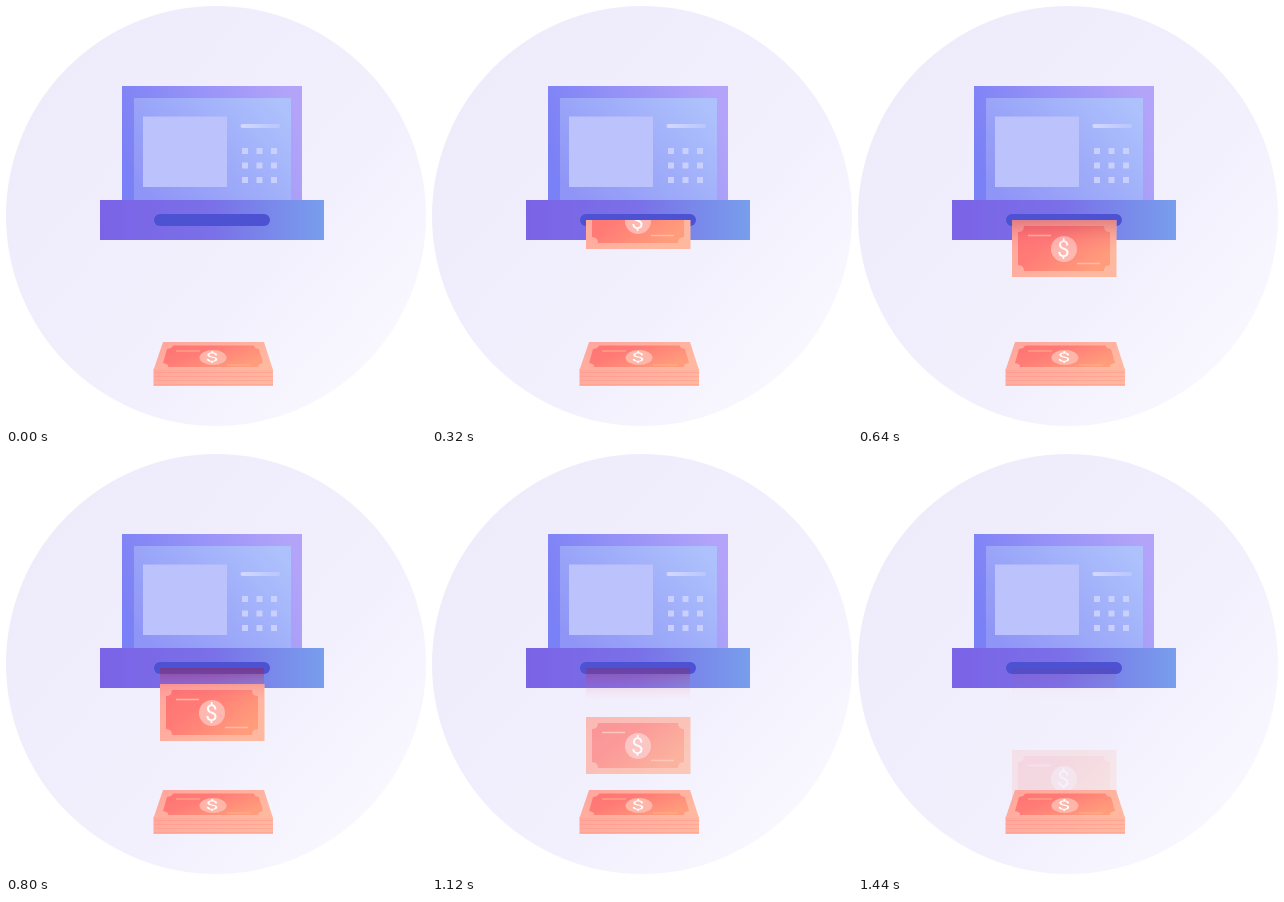
Write an HTML page that moves like this. It is 420 px wide and 420 px high and loops after 1.6 s.

```html
<!DOCTYPE html>
<html lang="en">
<head>
<meta charset="utf-8">
<title>Cash machine</title>
<style>
  html, body { margin: 0; width: 100%; height: 100%; overflow: hidden; background: #fff; }
  svg { display: block; width: 100vw; height: 100vh; }
  text { font: 22px Roboto, Arial, sans-serif; fill: #fff; text-anchor: middle; }
</style>
</head>
<body>
<svg viewBox="0 0 420 420">
  <defs>
    <linearGradient id="back" x1=".1" y1=".15" x2=".9" y2=".85">
      <stop stop-color="#eeecfb"/><stop offset=".65" stop-color="#f2f0fd"/><stop offset="1" stop-color="#f9f8ff"/>
    </linearGradient>
    <linearGradient id="case" x1="0" y1=".6" x2="1" y2=".4">
      <stop stop-color="#7a80f5"/><stop offset="1" stop-color="#b3a4f9"/>
    </linearGradient>
    <linearGradient id="panel" x1="0" y1=".8" x2="1" y2=".2">
      <stop stop-color="#8f95f6"/><stop offset="1" stop-color="#adc1fc"/>
    </linearGradient>
    <linearGradient id="base">
      <stop stop-color="#7b63e6"/><stop offset=".5" stop-color="#7a70e8"/><stop offset="1" stop-color="#789eec"/>
    </linearGradient>
    <linearGradient id="shine">
      <stop stop-color="#d4d9ff"/><stop offset="1" stop-color="#d4d9ff" stop-opacity=".35"/>
    </linearGradient>
    <linearGradient id="paper" x2="1" y2=".6">
      <stop stop-color="#ffa59d"/><stop offset="1" stop-color="#ffb8a0"/>
    </linearGradient>
    <linearGradient id="ink" x2="1" y2=".6">
      <stop stop-color="#ff7474"/><stop offset=".4" stop-color="#ff7b76"/><stop offset="1" stop-color="#ff9c7c"/>
    </linearGradient>
    <linearGradient id="shade" x2="0" y2="1">
      <stop stop-color="#a01e46" stop-opacity=".45"/><stop offset=".2" stop-color="#b4284b" stop-opacity=".36"/>
      <stop offset=".6" stop-color="#e65078" stop-opacity=".15"/><stop offset="1" stop-color="#ff6e8c" stop-opacity="0"/>
    </linearGradient>
    <clipPath id="below"><path d="M0 214H420V420H0z"/></clipPath>
  </defs>

  <circle cx="210" cy="210" r="210" fill="url(#back)"/>
  <path d="M116 80H296V194H116z" fill="url(#case)"/>
  <path d="M128 92H285V194H128z" fill="url(#panel)"/>
  <path d="M137 110.500H221V181H137z" fill="#bcc2fb"/>
  <rect x="234.500" y="118" width="39.500" height="4" rx="2" fill="url(#shine)"/>
  <g id="keys" fill="#c9d0fd"></g>
  <path d="M94 194H318V234H94z" fill="url(#base)"/>
  <rect x="148" y="208" width="116" height="12" rx="6" fill="#4c52d2"/>

  <g clip-path="url(#below)">
    <g id="bill">
      <path d="M0 0H104.500V57H0z" fill="url(#paper)"/>
      <path d="M12 6H92Q92 12 98 12V45Q92 45 92 51H12Q12 45 6 45V12Q12 12 12 6z" fill="url(#ink)"/>
      <path d="M16 15.500H39M65 43.500H88" stroke="#ffb9a4" stroke-width="1.500"/>
      <circle cx="52" cy="29" r="13" fill="#ffb8b0"/>
      <text x="51.500" y="37">$</text>
    </g>
  </g>
  <path id="shadow" d="M154 214H258V246H154z" fill="url(#shade)"/>

  <path d="M147.500 363H267V380H147.500z" fill="url(#paper)"/>
  <path d="M148 366.500H267M148 370.500H267M148 374.500H267M148 378.500H267" stroke="#ff8f83" stroke-opacity=".4"/>
  <path d="M157 336H258L267 364H147.500z" fill="url(#paper)"/>
  <path d="M167 339.500H248Q248 342.500 253 343L257 357Q251 358 252 361H162Q163 358 157 357L161 343Q166 342.500 167 339.500z" fill="url(#ink)"/>
  <path d="M170 345H194M221 359H245" stroke="#ffb08f"/>
  <ellipse cx="207" cy="351.500" rx="13.500" ry="7.500" fill="#ffb5a8"/>
  <text transform="translate(206 356) scale(1.050 .550)">$</text>
</svg>
<script>
  const byId = id => document.getElementById(id);
  const bill = byId('bill'), shadow = byId('shadow');
  const LOOP = 1600, STEP = 160;
  const clamp = v => Math.max(0, Math.min(1, v));

  for (let i = 0; i < 9; i++) {
    const x = 236 + i % 3 * 14.5, y = 142 + Math.floor(i / 3) * 14.5;
    byId('keys').innerHTML += `<rect x="${x}" y="${y}" width="6" height="6"/>`;
  }

  // The bill slides out of the slot, then drops behind the stack and fades
  function pose(t) {
    const y = 157 + 57 * clamp(t / 640) + 98 * clamp((t - 640) / 960);
    const fade = clamp((1560 - t) / 600);
    bill.setAttribute('transform', `translate(154 ${Math.round(y)})`);
    bill.setAttribute('opacity', fade);
    shadow.setAttribute('opacity', Math.min(fade, clamp((t - 320) / 480)));
  }

  const start = performance.now();
  function draw() {
    const elapsed = Math.max(0, performance.now() - start) % LOOP;
    pose(Math.floor(elapsed / STEP) * STEP);
    requestAnimationFrame(draw);
  }
  draw();
</script>
</body>
</html>
```
